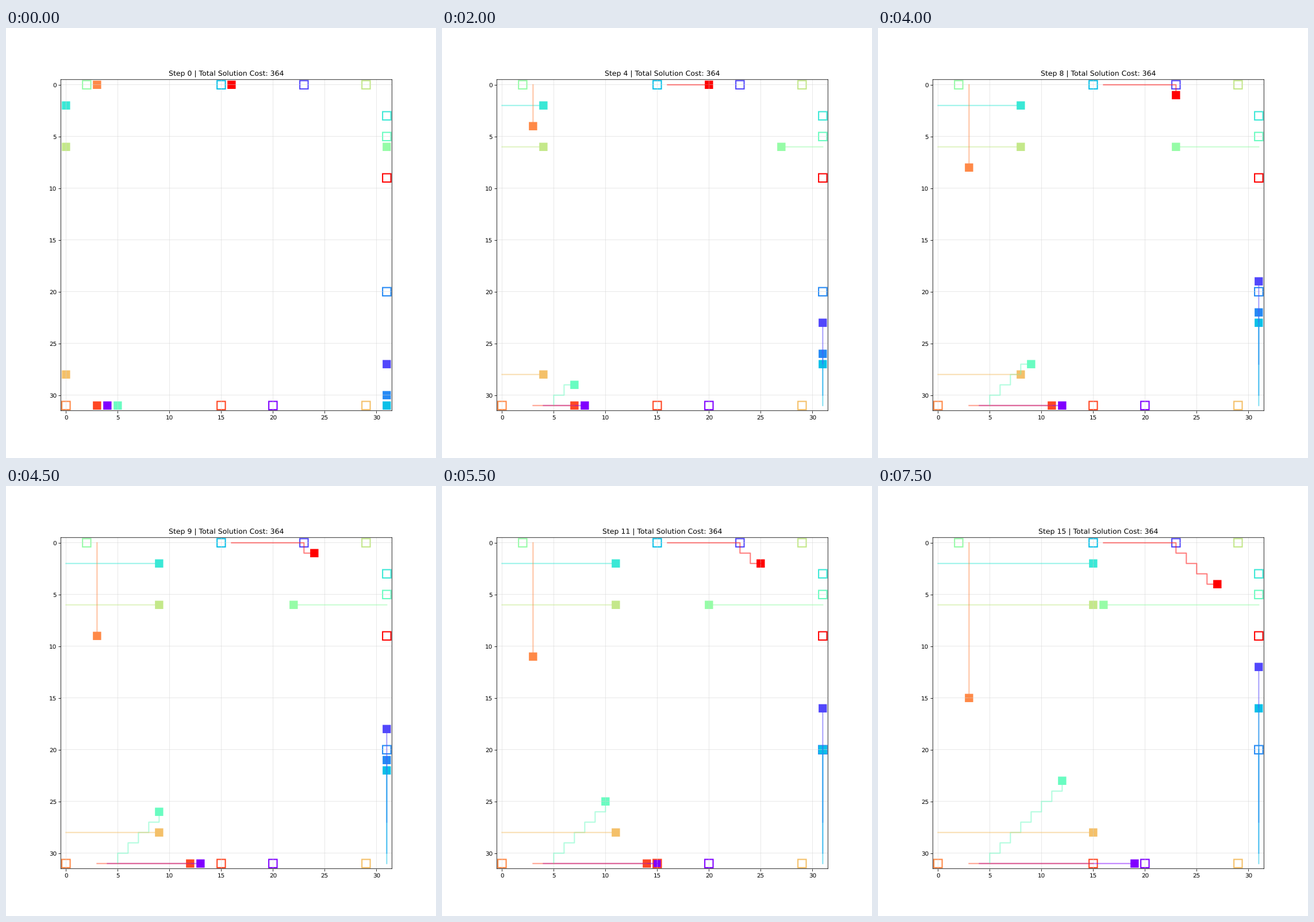
A matplotlib script that plays this animation: 748 by 748 pixels, repeating every 8 s.

```python
import numpy as np
import matplotlib.pyplot as plt
from matplotlib.animation import FuncAnimation
from matplotlib.patches import Rectangle

SIZE = 32
STEPS = 16
COST = 364
BOX = 0.8

RIGHT, LEFT, DOWN, UP = (1, 0), (-1, 0), (0, 1), (0, -1)

# start, goal, lead-in moves, then moves repeated until the goal
AGENTS = [
    ((4, 31), (20, 31), [], [RIGHT]),
    ((31, 27), (23, 0), [], [UP]),
    ((31, 30), (31, 20), [], [UP]),
    ((31, 31), (15, 0), [], [UP]),
    ((0, 2), (31, 3), [], [RIGHT]),
    ((5, 31), (31, 5), [], [UP, RIGHT]),
    ((31, 6), (2, 0), [], [LEFT]),
    ((0, 6), (29, 0), [], [RIGHT]),
    ((0, 28), (29, 31), [], [RIGHT]),
    ((3, 0), (0, 31), [], [DOWN]),
    ((3, 31), (15, 31), [], [RIGHT]),
    ((16, 0), (31, 9), [RIGHT] * 7, [DOWN, RIGHT]),
]


def walk(start, goal, lead, cycle):
    path = [start]
    while len(path) <= STEPS and path[-1] != goal:
        k = len(path) - 1
        dx, dy = lead[k] if k < len(lead) else cycle[(k - len(lead)) % len(cycle)]
        x, y = path[-1]
        path.append((x + dx, y + dy))
    return np.array(path)


def cell(pos, **style):
    x, y = pos
    return ax.add_patch(Rectangle((x - BOX / 2, y - BOX / 2), BOX, BOX, **style))


# keep sub-pixel positions instead of rounding edges to whole pixels
plt.rcParams.update({"font.family": "DejaVu Sans", "path.snap": False,
                     "text.hinting": "no_hinting"})
fig, ax = plt.subplots(figsize=(10, 10), dpi=74.8)
ax.set_xlim(-0.5, SIZE - 0.5)
ax.set_ylim(SIZE - 0.5, -0.5)
ax.set_aspect("equal")
ax.set_xticks(range(0, SIZE, 5))
ax.set_yticks(range(0, SIZE, 5))
ax.grid(True, color="lightgray", linewidth=0.5)
title = ax.set_title("")

paths = [walk(*agent) for agent in AGENTS]
colors = plt.cm.rainbow(np.linspace(0, 1, len(AGENTS)))
bodies, trails = [], []
for (start, goal, _, _), color in zip(AGENTS, colors):
    cell(goal, fill=False, edgecolor=color, linewidth=2)
    bodies.append(cell(start, facecolor=color, linewidth=0))
    trails += ax.plot([], [], color=color, alpha=0.5, linewidth=2)


def update(step):
    title.set_text(f"Step {step} | Total Solution Cost: {COST}")
    for path, body, trail in zip(paths, bodies, trails):
        done = path[:step + 1]
        # an agent leaves the board one step after arriving
        body.set_visible(step < len(path))
        body.set_xy(done[-1] - BOX / 2)
        if step:
            trail.set_data(done[:, 0], done[:, 1])
        else:
            trail.set_data([], [])
    return [title, *bodies, *trails]


anim = FuncAnimation(fig, update, frames=STEPS, init_func=lambda: update(0),
                     interval=500, repeat=True, repeat_delay=0, blit=False)
plt.show()
```
